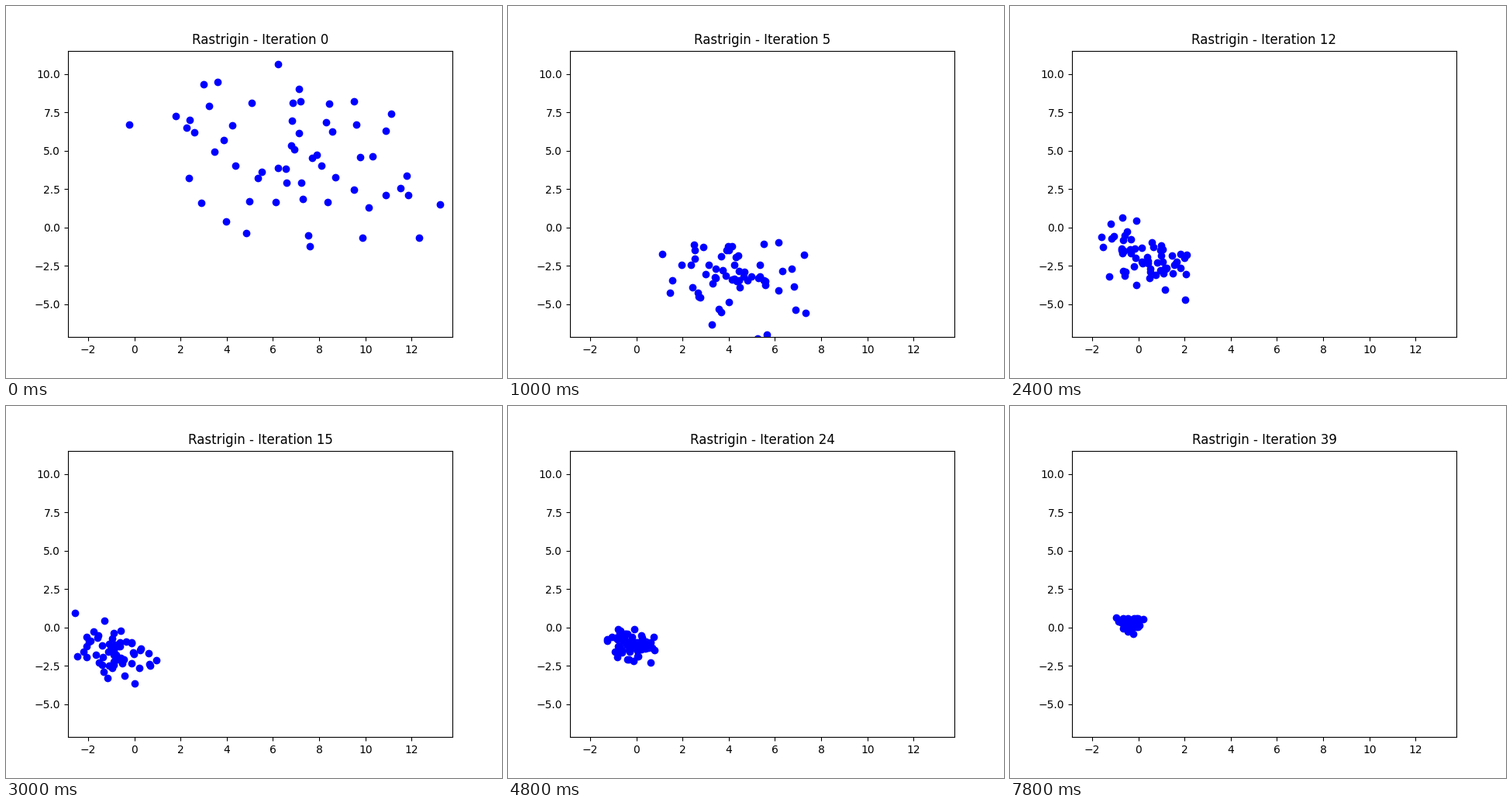
A matplotlib script that plays this animation: 640 px wide and 480 px high, repeating every 8 s.

```python
import matplotlib.pyplot as plt
import numpy as np
from matplotlib.animation import FuncAnimation

FRAMES, STEP_MS, POP = 40, 200, 60
TILT = -0.25        # correlation of x and y within the cloud

# Way of the cloud's centre: iteration, x, y
WAY = np.array([
    (0, 6.9, 4.7), (5, 4.2, -3.2), (9, 1.6, -2.3), (15, -0.9, -1.6),
    (24, -0.2, -1.1), (31, 0.2, -0.75), (39, -0.4, 0.3)])


def centre(i):
    return np.array([np.interp(i, WAY[:, 0], WAY[:, k]) for k in (1, 2)])


def spread(i):
    """Step size: one wide first draw, then a steady exponential decay."""
    return 1.9 * np.exp(-i / 18.5) + 1.1 * np.exp(-i)


def population(i):
    """A fresh normal sample per iteration, centred exactly on the way."""
    z = np.random.default_rng(100 + i).normal(size=(POP, 2))
    z = (z - z.mean(axis=0)) / z.std(axis=0)
    z[:, 1] = TILT * z[:, 0] + np.sqrt(1 - TILT ** 2) * z[:, 1]
    return centre(i) + spread(i) * z


fig, ax = plt.subplots(figsize=(6.4, 4.8), dpi=100)
ax.set_xlim(-2.869, 13.764)
ax.set_ylim(-7.136, 11.53)
dots = ax.scatter([], [], color="blue")
title = ax.set_title("")


def update(i):
    dots.set_offsets(population(i))
    title.set_text(f"Rastrigin - Iteration {i}")
    return dots, title


anim = FuncAnimation(fig, update, frames=FRAMES, interval=STEP_MS,
                     repeat=True, repeat_delay=0)
plt.show()
```
